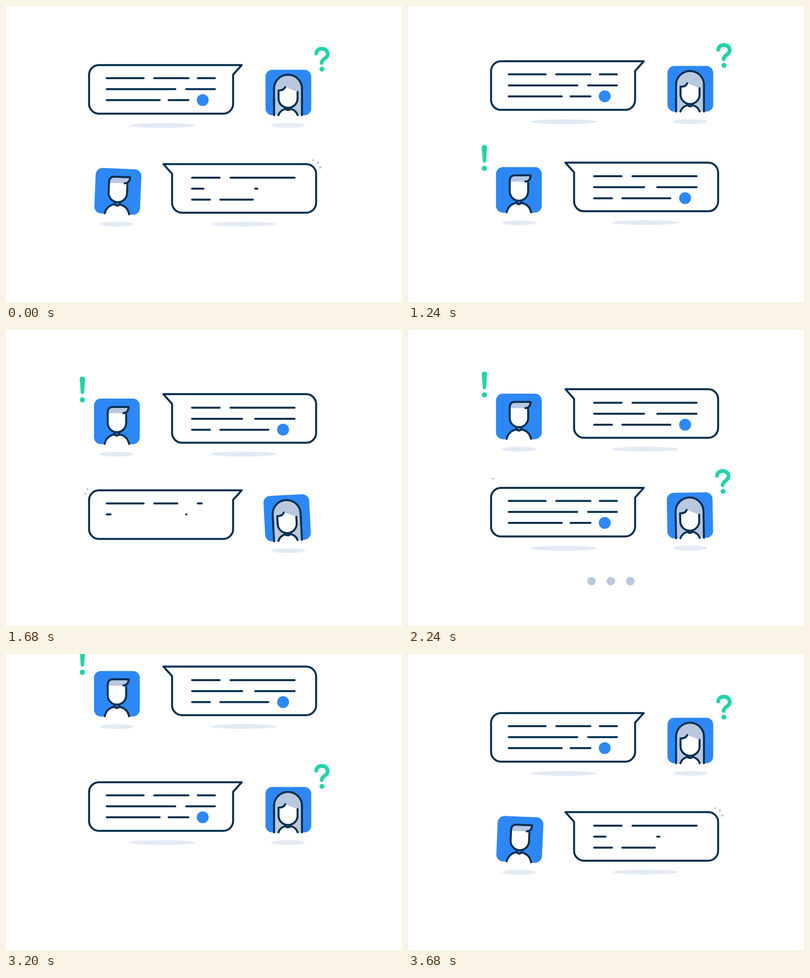
These frames come from a looping animation (800 by 600 pixels, 3720 ms). An HTML page with a canvas:

```html
<!DOCTYPE html>
<html lang="en">
<head>
<meta charset="utf-8">
<title>Chat</title>
<style>
html, body { margin: 0; width: 100%; height: 100%; overflow: hidden; background: #fff; }
canvas { display: block; }
</style>
</head>
<body>
<canvas id="stage" width="800" height="600"></canvas>
<script>
const ctx = document.getElementById('stage').getContext('2d');
const NAVY = '#032f4e', BLUE = '#2d88f5', HAIR = '#b9c8df', GREEN = '#22d3aa', SHADE = '#e4eaf5';
const LOOP = 3720, HALF = 1840, STEP = 40, ROW = 200.5;

const span = (t, from, length) => Math.min(1, Math.max(0, (t - from) / length));
const smooth = u => u * u * (3 - 2 * u);
const backOut = (u, k) => 1 + (k + 1) * (u - 1) ** 3 + k * (u - 1) ** 2;

// Quick start, long settle: cubic-bezier(.33, 0, .197, 1)
function glide(x) {
  let lo = 0, hi = 1;
  for (let i = 0; i < 20; i++) {
    const u = (lo + hi) / 2, v = 1 - u;
    if (.99 * u * v * v + .591 * u * u * v + u ** 3 < x) lo = u; else hi = u;
  }
  return smooth(lo);
}

function shape(path, fill, stroke, width = 4) {
  const p = new Path2D(path);
  if (fill) { ctx.fillStyle = fill; ctx.fill(p); }
  if (stroke) { ctx.strokeStyle = stroke; ctx.lineWidth = width; ctx.stroke(p); }
}

function oval(x, y, rx, ry, color) {
  ctx.fillStyle = color;
  ctx.beginPath();
  ctx.ellipse(x, y, rx, ry, 0, 0, 7);
  ctx.fill();
}

function tile(x, y) {
  ctx.fillStyle = BLUE;
  ctx.beginPath();
  ctx.roundRect(x, y, 92.4, 92.4, 14);
  ctx.fill();
}

function group(draw) { ctx.save(); draw(); ctx.restore(); }

function turn(x, y, degrees, scale = 1) {
  ctx.translate(x, y);
  ctx.rotate(degrees * Math.PI / 180);
  ctx.scale(scale, scale);
  ctx.translate(-x, -y);
}

function drawMan() {
  tile(177.8, 129);
  shape('M205.5 158V178.5a18.6 18.6 0 0 0 37.2 0V158Z', '#fff');
  shape('M205.5 158.5V156Q206 145.8 216 145.8H247.8Q246 158.5 237 158.5Z', HAIR);
  shape('M199 222Q203 204 219 202Q224 207 229 202Q245 204 249 222Z', '#fff');
  shape('M242.7 161V178.5a18.6 18.6 0 0 1-37.2 0V156Q206 145.8 216 145.8H247.8Q247 158.3 237 158.3' +
    'M199.3 220.8Q203 204.5 219 201.5Q224 206.5 229 201.5Q245 204.5 248.7 220.8M219 199V202M229 199V202', null, NAVY);
}

function drawWoman() {
  tile(524.2, 129);
  shape('M541.5 221.5V167.3a28.2 28.2 0 0 1 56.4 0V221.5Z', HAIR);
  shape('M550.6 171Q562 171 564 164L589 174V187a19.2 19.2 0 0 1-38.4 0Z', '#fff');
  shape('M550 222.5Q554 211 564.5 208.5Q569.8 213 575 208.5Q586 211 589.5 222.5Z', '#fff');
  shape('M541.5 221.3V167.3a28.2 28.2 0 0 1 56.4 0V221.3M589 174V187a19.2 19.2 0 0 1-38.4 0V171Q562 171 564 164' +
    'M550.3 221.3Q554 211 564.5 208.5Q569.8 213 575 208.5Q586 211 589.2 221.3M564.5 206V208.5M575 206V208.5', null, NAVY);
}

function drawExclamation() {
  shape('M149 89.5Q149 84.5 154.4 84.5Q160 84.5 159.8 90L157.8 117Q157.3 120 154.4 120Q151.4 120 151 117Z', GREEN);
  oval(154.3, 131.5, 5.3, 5.3, GREEN);
}

function drawQuestion() {
  shape('M626.8 96C627 90 632 86.5 638.5 86.5C645 86.5 650 91 650 97.5C650 106 638.3 106 637.7 115', null, GREEN, 7.6);
  oval(638.3, 127.8, 5, 5, GREEN);
}

// Text bars are [row, from, to], in the order they are typed.
const man = {
  side: 1, drawFace: drawMan, drawMark: drawExclamation, mark: [154.3, 131.5],
  x: 224, shadow: [479.5, 241.5], top: 147.5, dot: [559.8, 192],
  bars: [[0, 376, 431.5], [0, 453.5, 583], [2, 376, 412], [2, 433, 530], [1, 376, 477], [1, 503.5, 583]]
};
const woman = {
  side: -1, drawFace: drawWoman, drawMark: drawQuestion, mark: [638.3, 127.8],
  x: 570.2, shadow: [315, 242], top: 146, dot: [397.4, 190.5],
  bars: [[0, 203.5, 278], [0, 299.5, 368.5], [0, 387.5, 422], [1, 203.5, 342], [1, 364, 422],
    [2, 203.5, 310.5], [2, 328.5, 368.5]]
};

// Sparks by the bubble corner: start, end, delay
const SPARKS = [[-7, -8, -4, -19, 140], [2.5, -2.5, 14, -13, 0], [7.5, 7, 20, 4, 0]];

function drawSparks(t) {
  for (const [x0, y0, x1, y1, delay] of SPARKS) {
    const p = t - delay, head = span(p, -240, 440) ** 4, tail = smooth(span(p, 0, 300));
    if (p < -240 || tail === 1) continue;
    const at = k => `${627 + x0 + (x1 - x0) * k} ${120 + y0 + (y1 - y0) * k}`;
    shape(`M${at(Math.min(head, tail))}L${at(Math.max(head, tail) + .001)}`, null, HAIR);
  }
}

function drawText(who, t) {
  const typed = i => span(t, -647 + 80 * i, 440) ** 5;
  who.bars.forEach(([row, from, to], i) => {
    const part = typed(i), y = who.top + 22.3 * row;
    if (part > .005) shape(`M${from} ${y}H${from + (to - from) * part}`, null, NAVY);
  });
  const r = 12 * typed(who.bars.length);
  oval(...who.dot, r, r, BLUE);
}

function drawMessage(who, t) {
  if (t < -640 || t > 3700) return;
  const y = ROW + 692 * (1 - glide(span(t, -639, 540)))
    - ROW * glide(span(t, 1197, 670)) - 264 * glide(span(t, 3022, 670));
  group(() => {
    ctx.translate(0, y);
    oval(...who.shadow, 67.5 * smooth(span(t, -160, 180)), 5, SHADE);
    oval(who.x, 241.7, 34.5, 5, SHADE);
    group(() => {
      if (who.side < 0) ctx.transform(-1, 0, 0, 1, 794.3, -.5);
      shape('M318 120H606.5a20 20 0 0 1 20 20V198.5a20 20 0 0 1-20 20H355.5a20 20 0 0 1-20-20V139.5Z', '#fff', NAVY);
      drawSparks(t);
    });
    drawText(who, t);
    turn(who.x, 221.5, who.side * 2.4 * Math.max(0, 1 - t / 760) ** 1.1);
    who.drawFace();
    if (t > 80) {
      const wobble = 8 * Math.max(0, 1 - t / 1300) * Math.sin((t - 400) / 46);
      turn(...who.mark, who.side * wobble, backOut(span(t, 80, 300), 1.7));
      who.drawMark();
    }
  });
  for (let i = 0; i < 3; i++) {
    const grow = span(t, 80 + 40 * i, 280), fade = span(t, 540 + 40 * i, 180);
    const r = 8.6 * Math.max(0, backOut(grow, .8)) * (1 - fade * fade);
    if (grow > 0 && r > 0) oval(370.6 + 39.2 * i, 509, r, r, HAIR);
  }
}

function frame() {
  const t = Math.floor(performance.now() % LOOP / STEP) * STEP;
  ctx.clearRect(0, 0, 800, 600);
  ctx.lineCap = ctx.lineJoin = 'round';
  [woman, man, woman, man].forEach((who, i) => drawMessage(who, t - HALF * (i - 1)));
  requestAnimationFrame(frame);
}
frame();
</script>
</body>
</html>
```
